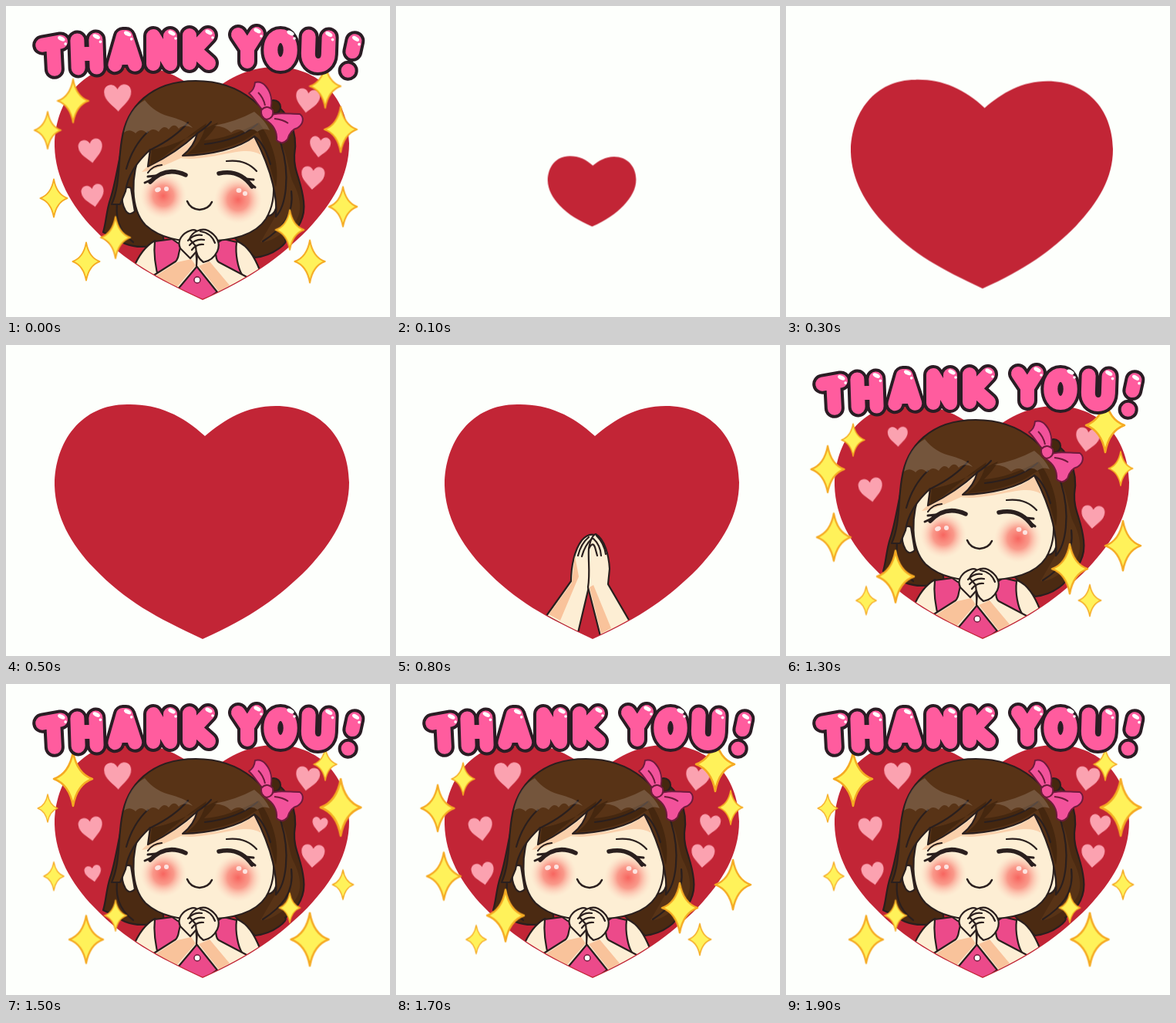
An HTML page that plays this animation: 498x403 px, repeating every 2000 ms.

```html
<!DOCTYPE html>
<html lang="en">
<head>
<meta charset="utf-8">
<title>Thank you</title>
<style>
html, body { margin: 0; width: 100%; height: 100%; overflow: hidden; background: #fdfffc; }
svg { display: block; width: 100%; height: 100%; }

/* The loop is entered at its end, so the complete picture shows first. */
.loop { animation: 2000ms step-end -1900ms infinite; }
.backdrop { animation-name: grow; transform-origin: 254px 245px; }
.prayer { animation-name: raise; }
.girl { animation-name: enter; transform-origin: 254px 381px; }
.sway { animation-name: sway; transform-origin: 262px 200px; }
.thank { animation-name: thank; transform-origin: 156px 60px; }
.you { animation-name: you; transform-origin: 376px 60px; }
.stars { animation-name: show; }
.star { animation: pulse 400ms step-end infinite; }
.star.even { animation-delay: -200ms; }

@keyframes grow {
  0% { transform: scale(.3); } 5% { transform: scale(.62); } 10% { transform: scale(.89); }
  15% { transform: scale(1.03); } 20%, 100% { transform: none; }
}
@keyframes raise {
  0% { visibility: hidden; } 25% { visibility: visible; transform: translateY(70px); }
  30% { visibility: visible; transform: translateY(25px); }
  35% { visibility: visible; transform: none; } 40%, 100% { visibility: hidden; }
}
@keyframes enter {
  0% { visibility: hidden; } 40% { visibility: visible; transform: scale(.94, .9); }
  45% { visibility: visible; transform: scale(1.01, 1.02); }
  50%, 100% { visibility: visible; transform: none; }
}
@keyframes sway { 0% { transform: none; } 50% { transform: scaleX(1.045); } 55%, 100% { transform: none; } }
@keyframes thank {
  0% { transform: scale(0); } 45% { transform: scale(.7); }
  50% { transform: scale(1.035); } 55%, 100% { transform: none; }
}
@keyframes you { 0% { transform: scale(0); } 55% { transform: scale(1.035); } 60%, 100% { transform: none; } }
@keyframes show { 0% { visibility: hidden; } 45%, 100% { visibility: visible; } }
@keyframes pulse { 0%, 50% { transform: scale(.8); } 25% { transform: scale(.6); } 75% { transform: scale(1); } }
@keyframes pop50 { 0% { transform: scale(0); } 50% { transform: scale(.74); } 55%, 100% { transform: none; } }
@keyframes pop55 { 0% { transform: scale(0); } 55% { transform: scale(.74); } 60%, 100% { transform: none; } }
@keyframes pop60 { 0% { transform: scale(0); } 60% { transform: scale(.74); } 65%, 100% { transform: none; } }
@keyframes pop70 { 0% { transform: scale(0); } 70% { transform: scale(.74); } 75%, 100% { transform: none; } }

.ink { stroke: #2a1f1e; stroke-width: 2.2; stroke-linejoin: round; stroke-linecap: round; }
.line { fill: none; }
.skin { fill: #fdeed4; }
.shade { fill: #f9c39b; }
.hair { fill: #583316; }
.back { fill: #4b2a12; }
.dark { fill: #45270f; }
.pink { fill: #f2529b; }
.shirt { fill: #ec4a8a; }
.gloss { fill: #a08d7a; fill-opacity: .38; }
.edge, .fill { fill: none; stroke-linejoin: round; stroke-linecap: round; }
.edge { stroke: #2a1d24; stroke-width: 26px; }
.fill { stroke: #ff5c9e; stroke-width: 18px; }
</style>
</head>
<body>
<svg viewBox="0 0 498 403" preserveAspectRatio="none">
  <defs>
    <path id="heart" d="M258 118C228 90 195 76 157 77C98 77 63 125 63 182C64 222 84 258 114 289C155 332 195 353 255 381C318 353 355 326 391 290C424 255 445 220 445 178C444 118 405 79 350 79C312 79 284 96 258 118Z"/>
    <clipPath id="frame">
      <use href="#heart" transform="translate(2.5 2.3) scale(.99)"/><rect width="498" height="270"/>
    </clipPath>
    <radialGradient id="blush">
      <stop offset="0" stop-color="#f7655f"/><stop offset=".45" stop-color="#f98a7d" stop-opacity=".85"/>
      <stop offset="1" stop-color="#fdd5c0" stop-opacity="0"/>
    </radialGradient>
  </defs>

  <use href="#heart" class="loop backdrop" fill="#c22536"/>
  <g id="hearts" fill="#fba2b0"></g>

  <g clip-path="url(#frame)">
    <g class="loop prayer">
      <path class="skin ink" d="M195 351L227 306C227 288 231 266 241 253Q249 244 257 246L255 290L249 318L236 373Z"/>
      <path class="shade" d="M198 349L228 308L232 273L237 300L213 357Z"/>
      <path class="skin ink" d="M265 377L249 314C252 295 249 280 250 264Q253 247 259 245C271 252 276 273 277 290L275 310L303 358Z"/>
      <path class="shade" d="M266 374L251 314L256 311L279 367Z"/>
      <path class="ink line" d="M236 273Q240 257 250 249M241 274Q245 259 254 251M250 264Q255 254 258 262L261 273M256 251Q265 259 266 273M260 247Q270 257 272 271"/>
    </g>

    <g class="loop girl">
      <g class="loop sway">
        <path class="back ink" d="M151 180C144 211 141 234 135 251C130 266 130 280 126 293Q132 297 139 296C149 309 169 317 205 308L190 200Z"/>
        <path class="back ink" d="M337 122C367 132 379 165 374 193C373 215 383 225 386 253C389 277 377 292 362 303C367 305 349 323 323 326L296 300L320 170Z"/>
        <path class="hair" d="M350 170C367 185 365 217 374 232C386 258 382 275 370 285C355 298 340 307 330 306L352 268Z"/>
        <path class="ink line" d="M145 249C141 272 145 291 165 306M370 240C374 270 358 289 333 305"/>
      </g>

      <path class="skin ink" d="M193 304C181 311 172 323 165 340L205 370L226 320Z"/>
      <path class="skin ink" d="M300 305C314 311 322 325 329 342L290 370L270 320Z"/>
      <path class="shirt ink" d="M193 305L216 302H282L299 306C297 322 301 340 306 348L255 384L199 358C194 340 191 322 193 305Z"/>
      <path class="skin ink" d="M214 301Q248 328 283 301Z"/>

      <path class="skin ink" d="M162 236C151 230 147 251 155 265Q160 273 167 266Z"/>
      <path class="skin ink" d="M342 240C354 236 354 255 348 267Q342 275 337 269Z"/>
      <path class="skin ink" d="M176 185C161 220 161 263 181 284C201 302 227 305 252 305C287 305 322 299 337 276C354 248 350 206 322 160L250 150Z"/>
      <path class="shade" opacity=".7" d="M184 207C205 199 230 185 250 166L230 194C266 195 300 189 322 170L331 193C310 180 285 196 238 198L227 197C211 204 190 214 176 215Z"/>
      <circle cx="204" cy="246" r="30" fill="url(#blush)"/>
      <circle cx="301" cy="251" r="31" fill="url(#blush)"/>
      <g fill="#fff" opacity=".75">
        <ellipse cx="197" cy="238" rx="4" ry="3" transform="rotate(-25 197 238)"/><circle cx="208" cy="237" r="3"/>
        <ellipse cx="302" cy="239" rx="3.4" ry="3"/><circle cx="310" cy="243" r="3"/>
      </g>
      <g class="ink line">
        <path stroke-width="5.5" d="M187 228Q207 207 233 219M276 217Q303 211 319 234"/>
        <path stroke-width="3" d="M191 224L180 229M194 220L184 221M315 229L323 235M311 224L321 225"/>
        <path d="M184 216Q190 207 202 206M286 201Q311 198 325 214"/>
        <path stroke-width="2.5" d="M235 253Q239 263 251 264Q263 263 267 254"/>
      </g>

      <path class="hair ink" d="M137 257C148 232 145 205 150 174C156 131 188 97 246 97C307 97 346 136 357 180C369 220 363 259 350 273C352 252 347 217 322 169C302 185 265 193 229 194C238 187 245 178 248 165C228 184 207 197 184 208L187 186C169 203 158 219 155 240L148 257Z"/>
      <path class="dark" d="M187 207C215 190 237 166 260 152C255 170 249 181 235 192C275 189 306 178 320 167L327 163C336 184 343 210 350 235C356 204 343 171 328 151C302 164 279 173 257 174Q270 161 275 151C246 163 224 181 189 186Z"/>
      <path class="ink line" d="M156 211C162 190 172 174 184 163M188 186Q219 171 236 151M248 165Q259 158 266 150M258 179Q302 174 326 153M322 169Q334 176 343 205"/>
      <path class="gloss" d="M153 164C157 143 167 129 180 122Q193 139 215 144Q236 150 242 158Q231 152 224 159Q218 150 211 160Q205 153 198 163Q190 156 183 165Q175 157 168 165Q160 158 153 164Z"/>
      <path class="gloss" d="M270 155Q298 150 322 137Q336 148 342 161Q333 157 326 163Q318 156 310 164Q302 156 292 164Q285 156 270 155Z"/>

      <circle class="dark ink" cx="347" cy="131" r="9"/>
      <g class="pink" stroke="#6e1a3c" stroke-width="2" stroke-linejoin="round">
        <path d="M335 137C328 131 322 119 315 113Q322 109 323 99Q331 97 337 104C343 111 346 122 343 134Z"/>
        <path d="M337 143C351 137 365 140 381 140C387 144 386 153 378 158Q369 160 365 173Q358 181 351 174C352 162 346 153 336 147Z"/>
        <path d="M331 135Q338 127 346 135Q348 145 338 147Q330 145 331 135Z"/>
        <path fill="none" d="M327 112Q334 119 336 129M348 146Q359 147 366 152"/>
      </g>

      <path class="skin ink" d="M228 309C222 319 226 325 220 331L190 350L222 368L248 337L245 305Z"/>
      <path class="skin ink" d="M268 309C275 322 270 328 276 332L314 352L275 372L247 337L249 305Z"/>
      <path class="shade" d="M222 332L194 350L220 366L246 336L240 328ZM250 337L276 370L290 362L264 331Z"/>
      <path class="skin ink" d="M226 314C221 303 230 294 239 291Q246 288 250 295L248 317L239 327Z"/>
      <path class="skin ink" d="M238 302C241 293 253 287 262 291C273 297 279 307 274 318Q268 330 256 332Q246 325 246 311Z"/>
      <path class="ink line" d="M236 304Q244 295 254 297M238 310Q246 301 257 303M241 316Q247 308 256 309M252 292Q266 294 271 307"/>
      <circle cx="248" cy="355" r="4" fill="#fff" stroke="#6e1a3c" stroke-width="1.5"/>
    </g>
  </g>

  <g id="stars" class="loop stars" fill="#fff25a" stroke="#f5aa22" stroke-width="2.6" stroke-linejoin="round"></g>
  <g id="words" role="img" aria-label="THANK YOU!"></g>
</svg>
<script>
const fill = (id, items, make) => { document.getElementById(id).innerHTML = items.map(make).join(""); };

// x, y, width, tilt, moment of appearing in percent of the loop
const hearts = [
  [110, 187, 31, -8, 50], [391, 122, 31, 8, 50], [398, 222, 30, 4, 55],
  [145, 118, 35, -2, 60], [407, 182, 27, 8, 70], [113, 245, 29, -10, 70]
];
fill("hearts", hearts, ([x, y, width, tilt, start]) =>
  `<g transform="translate(${x} ${y}) rotate(${tilt}) scale(${width / 32})">
    <path class="loop" style="animation-name:pop${start}" d="M0 -9C4 -18 16 -16 16 -6C16 4 6 10 0 17C-6 10 -16 4 -16 -6C-16 -16 -4 -18 0 -9Z"/></g>`);

// x, y, size, phase
const stars = [
  [87, 123, 1, ""], [434, 160, 1.05, ""], [104, 331, .88, ""], [394, 331, .98, ""],
  [54, 161, .86, "even"], [62, 249, .88, "even"], [437, 260, .92, "even"],
  [414, 104, 1, "even"], [142, 300, .96, "even"], [368, 290, .92, "even"]
];
fill("stars", stars, ([x, y, size, phase]) =>
  `<g transform="translate(${x} ${y}) scale(${size})">
    <path class="star ${phase}" d="M0 -35Q5 -7 25 0Q5 7 0 35Q-5 7 -25 0Q-5 -7 0 -35Z"/></g>`);

// Centre lines of the balloon letters
const strokes = {
  T: "M-12 -15L12 -18M2 -16V17",
  H: "M-12 -18V18M12 -18V18M-12 0H12",
  A: "M-13 18L-2 -18H2L13 18M-8 9H8",
  N: "M-11 18V-18L11 18V-18",
  K: "M-12 18V-18M12 -18L-6 1L13 18",
  Y: "M-12 -17L0 1L12 -18M0 1V18",
  O: "M0 -18C17 -18 17 18 0 18C-17 18 -17 -18 0 -18Z",
  U: "M-13 -18V4C-13 24 13 24 13 4V-18",
  "!": "M3 -19L1 -5M-3 20h.1"
};
// letter, x, y, tilt
const words = [
  ["thank", [["T", 60, 65, -3], ["H", 105, 62, -2], ["A", 154, 58, -1], ["N", 202, 57, 0], ["K", 250, 56, 0]]],
  ["you", [["Y", 313, 54, 0], ["O", 356, 57, 0], ["U", 405, 58, 2], ["!", 448, 64, 4]]]
];
const place = ([, x, y, tilt]) => `transform="translate(${x} ${y}) rotate(${tilt})"`;
const balloon = item => `<path ${place(item)} d="${strokes[item[0]]}"/>`;
const shine = item => {
  const side = "A!".includes(item[0]) ? 4 : 13;
  return `<g ${place(item)} fill="#fff">
    <ellipse cx="${side}" cy="-22" rx="5" ry="2.6" transform="rotate(28 ${side} -22)"/>
    <circle cx="${side + 5}" cy="-15" r="1.8"/></g>`;
};
fill("words", words, ([name, letters]) =>
  `<g class="loop ${name}"><g class="edge">${letters.map(balloon).join("")}</g>
    <g class="fill">${letters.map(balloon).join("")}</g>${letters.map(shine).join("")}</g>`);
</script>
</body>
</html>
```
